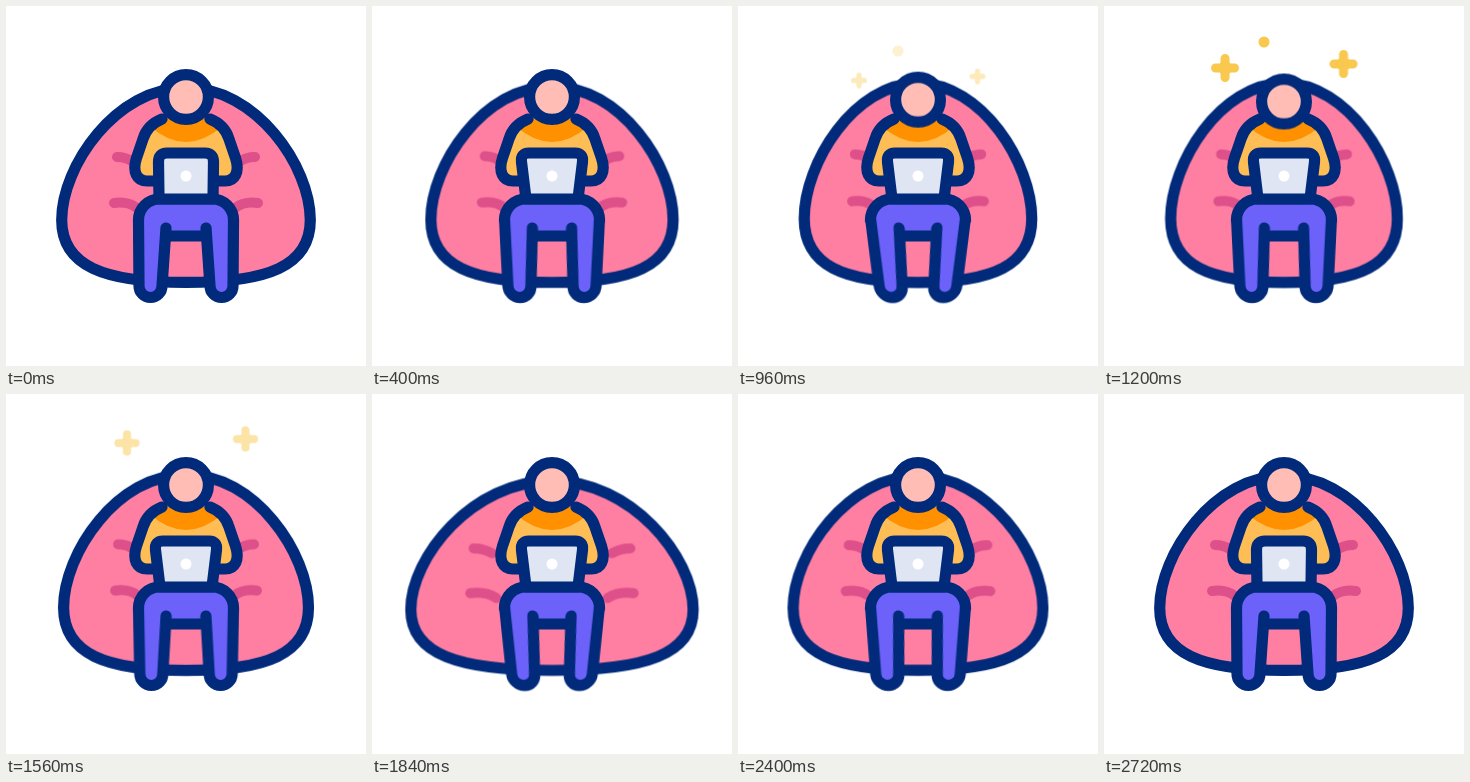
Animation of 360 by 360 pixels, one loop 3000 ms. Source, as an HTML page:

```html
<!DOCTYPE html>
<html lang="en">
<head>
<meta charset="utf-8">
<title>Working on a beanbag</title>
<style>
  :root { --ease: cubic-bezier(.37, 0, .63, 1); }
  html, body { margin: 0; width: 100%; height: 100%; overflow: hidden; background: #fff; }
  svg { display: block; width: 100vw; height: 100vh; }

  .line { stroke: #012a7a; stroke-width: 11.2; stroke-linecap: round; stroke-linejoin: round; }
  .bag path { vector-effect: non-scaling-stroke; }
  .fold { fill: none; stroke: #de5089; stroke-width: 10; stroke-linecap: round; }
  .star { fill: #f9c84e; stroke: #f9c84e; stroke-width: 9; stroke-linecap: round; }

  .bag, .leg, .lid, .head, .star, .dot { animation: 3s infinite var(--ease); }
  .bag { animation-name: squash; transform-origin: 180px 276px; }
  .leg { animation-name: swing; transform-origin: 0 212px; fill: #6c62fa; }
  .lid { animation-name: tilt; fill: #e0e5f4; }
  .head { animation-name: nod; fill: #ffbdb5; }
  .star { animation-name: rise; }
  .dot { animation-name: pop; fill: #f9c84e; }

  @keyframes squash {
    0%, 5.333% { transform: scale(1, 1); }
    26.667% { transform: scale(.917, 1.022); }
    40% { transform: scale(.912, 1.022); animation-timing-function: cubic-bezier(.55, 0, .7, .72); }
    62.667% { transform: scale(1.15, .97); animation-timing-function: cubic-bezier(.38, .1, .58, 1); }
    82.667%, 100% { transform: scale(1, 1); }
  }
  @keyframes swing {
    0%, 5.333%, 48%, 90.667%, 100% { transform: skewX(0deg); }
    26.667%, 69.333% { transform: skewX(8deg); }
  }
  @keyframes tilt {
    0%, 4%, 90.667%, 100% {
      d: path("M153 193 L152.5 156 Q152.5 147 161 147 L199 147 Q207.5 147 207.5 156 L207 193 Z");
    }
    13.333%, 80% {
      d: path("M154 193 L149.5 156 Q148.5 147 157 147 L203 147 Q211.5 147 210.5 156 L206 193 Z");
    }
  }
  @keyframes nod {
    0%, 26.667%, 48%, 100% { transform: translateY(0); }
    37.333% { transform: translateY(5.3px); }
  }
  @keyframes rise {
    0%, 29.333% { transform: translateY(20px) scale(.3); opacity: 0; animation-timing-function: ease-out; }
    40% { transform: translateY(0) scale(1); opacity: 1; animation-timing-function: ease-out; }
    46% { opacity: 1; animation-timing-function: linear; }
    52% { transform: translateY(-13px) scale(.9); opacity: .5; animation-timing-function: linear; }
    56%, 100% { transform: translateY(-14px) scale(.85); opacity: 0; }
  }
  @keyframes pop {
    0%, 29.333% { transform: translateY(12px); opacity: 0; }
    37.333%, 42% { transform: translateY(0); opacity: 1; }
    48%, 100% { transform: translateY(0); opacity: 0; }
  }
</style>
</head>
<body>
<svg viewBox="0 0 360 360">
  <g transform="translate(121 62)"><g class="star"><path d="M-9.5 0H9.5M0 -9.5V9.5"/><circle r="2.5"/></g></g>
  <g transform="translate(239.5 58)"><g class="star"><path d="M-9.5 0H9.5M0 -9.5V9.5"/><circle r="2.5"/></g></g>
  <circle class="dot" cx="160" cy="36" r="5.5"/>

  <g class="bag">
    <path class="line" fill="#ff7fa3" d="M180 81.5C110 81.5 55.7 160 55.7 214C55.7 260 98 276.4 180 276.4C262 276.4 304.3 260 304.3 214C304.3 160 250 81.5 180 81.5Z"/>
    <path class="fold" d="M111 151Q120 151 127 156M108 197Q122 195 131 202M249 151Q240 151 233 156M252 197Q238 195 229 202"/>
  </g>

  <!-- torso -->
  <path fill="#ffbe55" d="M156 113C146 117 140 123 137 133L130.5 152C126 166 131 175 141 175H219C229 175 234 166 229.5 152L223 133C220 123 214 117 204 113Z"/>
  <path fill="#ff9100" d="M144 120.5Q180 151.5 216 120.5L204 113H156Z"/>
  <path class="line" fill="none" d="M156 113C146 117 140 123 137 133L130.5 152C126 166 131 175 141 175H219C229 175 234 166 229.5 152L223 133C220 123 214 117 204 113"/>

  <!-- legs -->
  <path fill="#6c62fa" d="M132.5 214A21 21 0 0 1 153.5 193H206.5A21 21 0 0 1 227.5 214V230H132.5Z"/>
  <path class="line" d="M160 230H200"/>
  <path class="line leg" d="M132.5 214L133 280A11.5 11.5 0 0 0 156 280L160 222"/>
  <g transform="matrix(-1 0 0 1 360 0)">
    <path class="line leg" d="M132.5 214L133 280A11.5 11.5 0 0 0 156 280L160 222"/>
  </g>
  <path class="line" fill="none" d="M132.5 214A21 21 0 0 1 153.5 193H206.5A21 21 0 0 1 227.5 214"/>

  <!-- laptop -->
  <path class="line lid" d="M153 193 L152.5 156 Q152.5 147 161 147 L199 147 Q207.5 147 207.5 156 L207 193 Z"/>
  <circle cx="180" cy="170" r="5.5" fill="#fff"/>

  <circle class="line head" cx="180" cy="91" r="22.4"/>
</svg>
</body>
</html>
```
